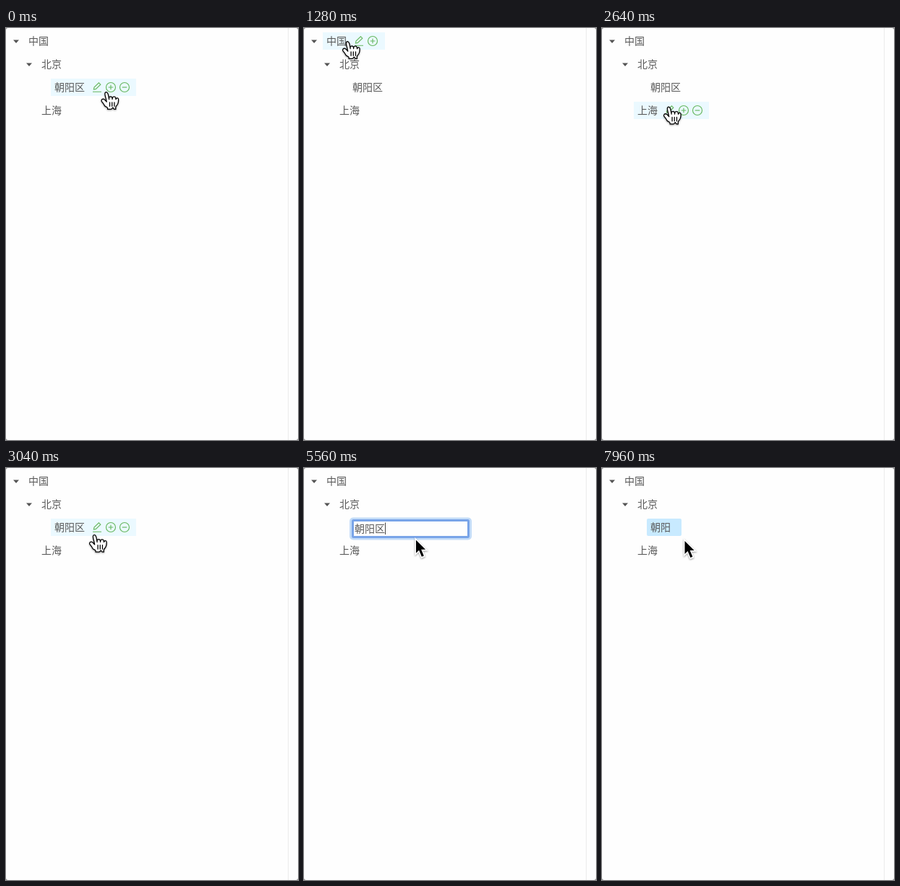
Animation of 404 by 570 pixels, one loop 8000 ms. Source, as an HTML page:

```html
<!DOCTYPE html>
<html lang="zh-CN">
<head>
<meta charset="utf-8">
<style>
html, body { margin: 0; width: 100%; height: 100%; overflow: hidden; background: #8a8a8a; }
svg { display: block; width: 404px; height: 570px; }
text { font: 14px "Noto Sans CJK SC", "Noto Sans CJK", sans-serif; fill: #595959; }
.icon { fill: none; stroke: #66b75e; stroke-width: 1.15; }
.cursor { filter: drop-shadow(0 1px 1px #0006); }
</style>
</head>
<body>
<svg viewBox="0 0 404 570">
  <rect width="404" height="570" rx="3" fill="#fefefe"/>
  <path d="M390.5 0V570" stroke="#ebebeb"/>
  <path d="M10 16.5h8l-4 4.5zM28 48.5h8l-4 4.5z" fill="#555"/>
  <g id="tree"></g>
  <g id="editor">
    <rect id="glow" x="65" y="70.5" width="165" height="27" rx="3" fill="none" stroke="#c3dcf8" stroke-width="4"/>
    <rect x="67.5" y="72.5" width="160" height="23" rx="1" fill="#fefefe" stroke="#79a4e8" stroke-width="3"/>
    <text id="value" x="70" y="89"></text>
    <path id="caret" d="M.5 75.5v16.5" stroke="#444"/>
  </g>
  <g id="hand" class="cursor"><g transform="scale(1.6) translate(-11.5 -8)" stroke="#000" stroke-width=".8" stroke-linejoin="round" stroke-linecap="round">
    <path fill="#fff" d="M11.3 20.4c-.3-.4-.6-1.1-1.2-2-.3-.5-1.2-1.5-1.5-1.9-.2-.4-.2-.6-.1-1 .1-.6.7-1.1 1.4-1.1.5 0 1 .4 1.4.7.2.2.5.6.7.8l.6.6c.2.3.3.5.2.1-.1-.5-.2-1.3-.4-2.1l-.6-2.4c-.1-.3-.2-1.1-.3-1.5-.1-.5-.1-1.4.3-1.8.3-.3.9-.4 1.3-.2.5.3.8 1 .9 1.3.2.5.4 1.2.5 2 .2 1 .5 2.5.5 2.8 0-.4-.1-1.1 0-1.5.1-.3.3-.7.7-.8.3-.1.6-.1.9-.1.3.1.6.3.8.5.4.6.4 1.9.4 1.8.1-.4.1-1.2.3-1.6.1-.2.5-.4.7-.5.3-.1.7-.1 1 0 .2 0 .6.3.7.5.2.3.3 1.3.4 1.7 0 .1.1-.4.3-.7.4-.6 1.8-.8 1.9.6v1c0 .5 0 .8-.1 1.2 0 .3-.2 1-.3 1.3-.1.3-.4 1-.7 1.4 0 0-1.1 1.2-1.2 1.8-.1.5-.1.6-.1 1 0 .4.1.9.1.9s-.8.1-1.2 0c-.4-.1-.9-.8-1-1.1-.2-.3-.5-.3-.7 0-.2.4-.7 1.1-1.1 1.1-.7.1-2.1 0-3.1 0 0 0 .2-1-.2-1.4z"/>
    <path d="M15.6 17.3v3.4m2-3.4v3.4m2-3.4v3.4"/>
  </g></g>
  <g id="arrow" class="cursor"><g transform="scale(1.6) translate(-9.2 -7.3)">
    <path fill="#fff" d="M8.2 4.9L19.8 16.5H13l-.4.1-4.4 4.3zM17.3 21.6l-3.6 1.5L9 12l3.7-1.5z"/>
    <path d="M9.2 7.3v11.2l3-2.9.4-.1h4.8z"/>
    <rect x="12.5" y="13.6" width="2" height="8" transform="matrix(.9221 -.3871 .3871 .9221 -5.7605 6.5909)"/>
  </g></g>
</svg>
<script>
const LOOP = 8000, STEP = 40, EDIT = 3680, HIDE = 6840, ERASE = 6920, SAVE = 7360, RETURN = 7840;
const $ = id => document.getElementById(id);
const show = (el, on) => el.setAttribute('visibility', on ? 'inherit' : 'hidden');

// Pointer tip: time, x, y
const track = [
  [40, 137, 88], [560, 62, 53], [720, 62, 53], [1080, 56.5, 17], [1240, 56.5, 17],
  [1280, 58.5, 18], [2040, 85, 89], [2080, 87, 93], [2360, 82, 119], [2520, 82, 119],
  [2640, 90.5, 108.5], [3240, 131, 86], [3640, 131, 86], [3720, 133, 86.5], [3760, 133, 86.5],
  [4000, 155, 99], [7800, 155, 101], [7840, 152, 101], [7960, 114.5, 101]
];

function pointerAt(t) {
  const next = track.findIndex(k => k[0] > t);
  if (next < 1) return (next ? track[track.length - 1] : track[0]).slice(1);
  const a = track[next - 1], b = track[next];
  const u = (t - a[0]) / (b[0] - a[0]), e = u * u * (3 - 2 * u);
  return [1, 2].map(i => a[i] + (b[i] - a[i]) * e);
}

const pencil = x => `<path d="M${x - 6} 6.2h12m-10.6-3.2l.6-3 6.4-6.2 2.4 2.4-6.4 6.2z"/>`;
const badge = (x, plus) => `<circle cx="${x}" r="6.5"/><path d="M${x - 3.3} 0h6.6${plus ? 'm-3.3-3.3v6.6' : ''}"/>`;

const rows = [['中国', 31], ['北京', 49], ['朝阳区', 67], ['上海', 49]].map(([label, x], i) => {
  const end = x + label.length * 14;
  $('tree').insertAdjacentHTML('beforeend', `<g transform="translate(0 ${18 + 32 * i})">
    <g><rect x="${x - 5}" y="-12" width="${end - x + (i ? 76 : 58)}" height="24" fill="#ebf9ff"/>
    <g class="icon">${pencil(end + 17)}${badge(end + 36, true)}${i ? badge(end + 55) : ''}</g></g>
    <rect x="${x - 5}" y="-12" width="48" height="24" rx="2" fill="#c8eaff" visibility="hidden"/>
    <text x="${x}" y="5">${label}</text></g>`);
  const [hover, selected, text] = $('tree').lastElementChild.children;
  return { hover, selected, text };
});

function draw(now) {
  const t = Math.floor(now % LOOP / STEP) * STEP;
  const [x, y] = pointerAt(t);
  const editing = t >= EDIT && t < SAVE;
  const isHand = t < 3800;
  const hovered = isHand && !editing && (y + 26) % 32 <= 24 ? Math.floor((y - 6) / 32) : -1;
  rows.forEach((row, i) => show(row.hover, i === hovered));

  const district = rows[2];
  show(district.text, !editing);
  show(district.selected, t >= SAVE);
  district.text.textContent = t >= SAVE ? '朝阳' : '朝阳区';

  show($('editor'), editing);
  $('glow').setAttribute('opacity', Math.max(0, Math.min(1, (t - EDIT) / 200)));
  const value = t < ERASE ? '朝阳区' : '朝阳';
  $('value').textContent = value;
  $('caret').setAttribute('transform', `translate(${70 + value.length * 14})`);
  const blinkOff = [4160, 5080, 6000].some(s => t >= s && t < s + (s === 5080 || s === 4160 ? 480 : 480));
  show($('caret'), editing && !blinkOff);

  const at = `translate(${x} ${y})`;
  $('hand').setAttribute('transform', at);
  $('arrow').setAttribute('transform', at);
  show($('hand'), isHand);
  show($('arrow'), !isHand && (t < HIDE || t >= RETURN));
}

const start = performance.now();
function tick() {
  draw(performance.now() - start);
  requestAnimationFrame(tick);
}
tick();
</script>
</body>
</html>
```
